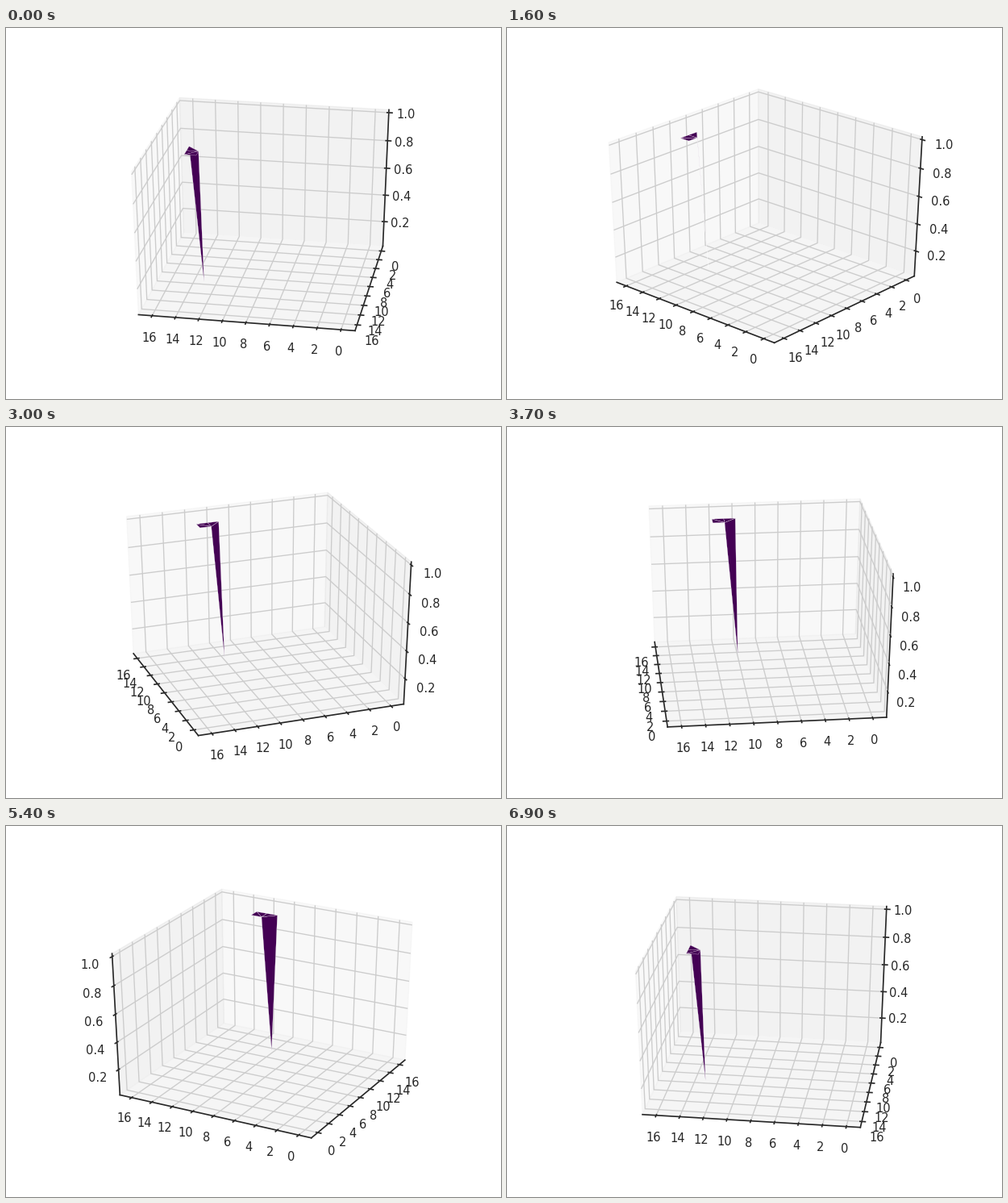
A matplotlib script that plays this animation: 614x460 px, repeating every 7 s.

```python
import numpy as np
import matplotlib.pyplot as plt
from matplotlib.animation import FuncAnimation
from matplotlib.collections import LineCollection, PolyCollection
from matplotlib.patches import Polygon

W, H, DPI = 614, 460, 64
PT = 1.5                                  # scales points given for 96 dpi
FRAMES, INTERVAL = 70, 100
ELEV = np.radians(30)
DIST = 10

# Plot area in pixels, and the window of the projection it shows
LEFT, BOTTOM, WIDTH, HEIGHT = 76.8, 50.688, 476.16, 354.816
VIEW_MIN, VIEW_SPAN = -0.095, 0.185

# The box is a unit cube around the origin, slightly padded
EDGE = 0.5 + 1 / 48
DELTA = 1 / 12
LABEL_GAP = 11.5 * 48 / (72 * 8.656) * DELTA
CENTERS = np.array([8, 8, 0.515625])
RANGES = np.array([17.6, 17.6, 0.96875])

INK = "0.15"
GRID = "0.8"
PANE_GREYS = (0.95, 0.90, 0.925)
PURPLE = "#440154"

PLAIN_TICKS = [(v, str(v)) for v in range(0, 17, 2)]
HEIGHT_TICKS = [(v / 10, f"{v / 10:.1f}") for v in range(2, 11, 2)]
TICKS = (PLAIN_TICKS, PLAIN_TICKS, HEIGHT_TICKS)
SHIFTED = (1, 0, 0)                       # direction in which each axis leaves the back corner

TIP, A, B, C, D, E = (
    (13, 10, 1 / 32), (14, 10, 1), (13, 11, 1),
    (14, 11, 1), (14, 12, 1), (13, 12, 1),
)
TRIANGLES = (np.array([
    (TIP, A, B), (A, C, B), (B, C, D), (B, D, E),
]) - CENTERS) / RANGES


def make_projection(azim):
    """Return a function from box coordinates to pixels and depth."""
    c, s = np.cos(azim), np.sin(azim)

    def project(points):
        x, y, z = np.moveaxis(np.asarray(points, float), -1, 0)
        side = -s * x + c * y
        near = c * x + s * y
        up = z * np.cos(ELEV) - near * np.sin(ELEV)
        depth = DIST - near * np.cos(ELEV) - z * np.sin(ELEV)
        px = LEFT + (side / depth - VIEW_MIN) / VIEW_SPAN * WIDTH
        py = BOTTOM + (up / depth - VIEW_MIN) / VIEW_SPAN * HEIGHT
        return np.stack([px, py], axis=-1), depth

    return project


def moved(point, axis, value):
    point = np.array(point, float)
    point[axis] = value
    return point


def add_lines(segments, color, width, zorder, cap="butt"):
    ax.add_collection(LineCollection(
        segments, colors=color, linewidths=width * PT,
        capstyle=cap, zorder=zorder), autolim=False)


def draw_pane(axis, back, project):
    u, v = [i for i in range(3) if i != axis]
    corners = []
    for a, b in ((-1, -1), (-1, 1), (1, 1), (1, -1)):
        corners.append(moved(moved(back, u, a * EDGE), v, b * EDGE))
    color = (PANE_GREYS[axis],) * 3 + (0.5,)
    ax.add_patch(Polygon(project(corners)[0], closed=False, facecolor=color,
                         edgecolor=color, linewidth=PT, zorder=0))


def draw_axis(axis, back, project):
    z = axis + 1
    out = SHIFTED[axis]
    edge = moved(back, out, -back[out])
    ends = [moved(edge, axis, -EDGE), moved(edge, axis, EDGE)]
    add_lines([project(ends)[0]], INK, 1.25, z, "projecting")

    values = [(v - CENTERS[axis]) / RANGES[axis] for v, _ in TICKS[axis]]
    grid, marks = [], []
    for v in values:
        corner = moved(back, axis, v)
        i, j = (axis + 1) % 3, (axis + 2) % 3
        grid.append([moved(corner, i, -back[i]), corner,
                     moved(corner, j, -back[j])])
        tick = moved(edge, axis, v)
        inward = np.sign(back[out]) * DELTA
        marks.append([moved(tick, out, edge[out] + 0.1 * inward),
                      moved(tick, out, edge[out] - 0.2 * inward)])
    add_lines(project(grid)[0], GRID, 1, z)
    add_lines(project(marks)[0], INK, 1.25, z, "projecting")

    for v, (_, text) in zip(values, TICKS[axis]):
        spot = moved(edge + np.sign(edge) * LABEL_GAP, axis, v)
        x, y = project(spot)[0]
        ax.text(x, y, text, ha="center", va="top", color=INK,
                family="DejaVu Sans", fontsize=11 * PT, zorder=z)


def draw_surface(project):
    points, depth = project(TRIANGLES)
    order = np.argsort(-depth.mean(axis=1))
    ax.add_collection(PolyCollection(
        points[order], facecolors=PURPLE, edgecolors="white",
        linewidths=0.2 * PT, zorder=5), autolim=False)


def draw(frame):
    ax.clear()
    ax.set(xlim=(0, W), ylim=(0, H))
    ax.axis("off")
    # The camera sweeps from 70 to 208 degrees, then jumps back
    azim = np.radians(70 + (30 + 2 * frame) % 140)
    project = make_projection(azim)
    back = np.array([
        EDGE if np.cos(azim) < 0 else -EDGE,
        EDGE if np.sin(azim) < 0 else -EDGE,
        -EDGE,
    ])
    for axis in range(3):
        draw_pane(axis, back, project)
    for axis in range(3):
        draw_axis(axis, back, project)
    draw_surface(project)
    return []


fig = plt.figure(figsize=(W / DPI, H / DPI), dpi=DPI, facecolor="white")
ax = fig.add_axes([0, 0, 1, 1])
anim = FuncAnimation(fig, draw, frames=FRAMES, interval=INTERVAL,
                     repeat=True, repeat_delay=0)
plt.show()
```
